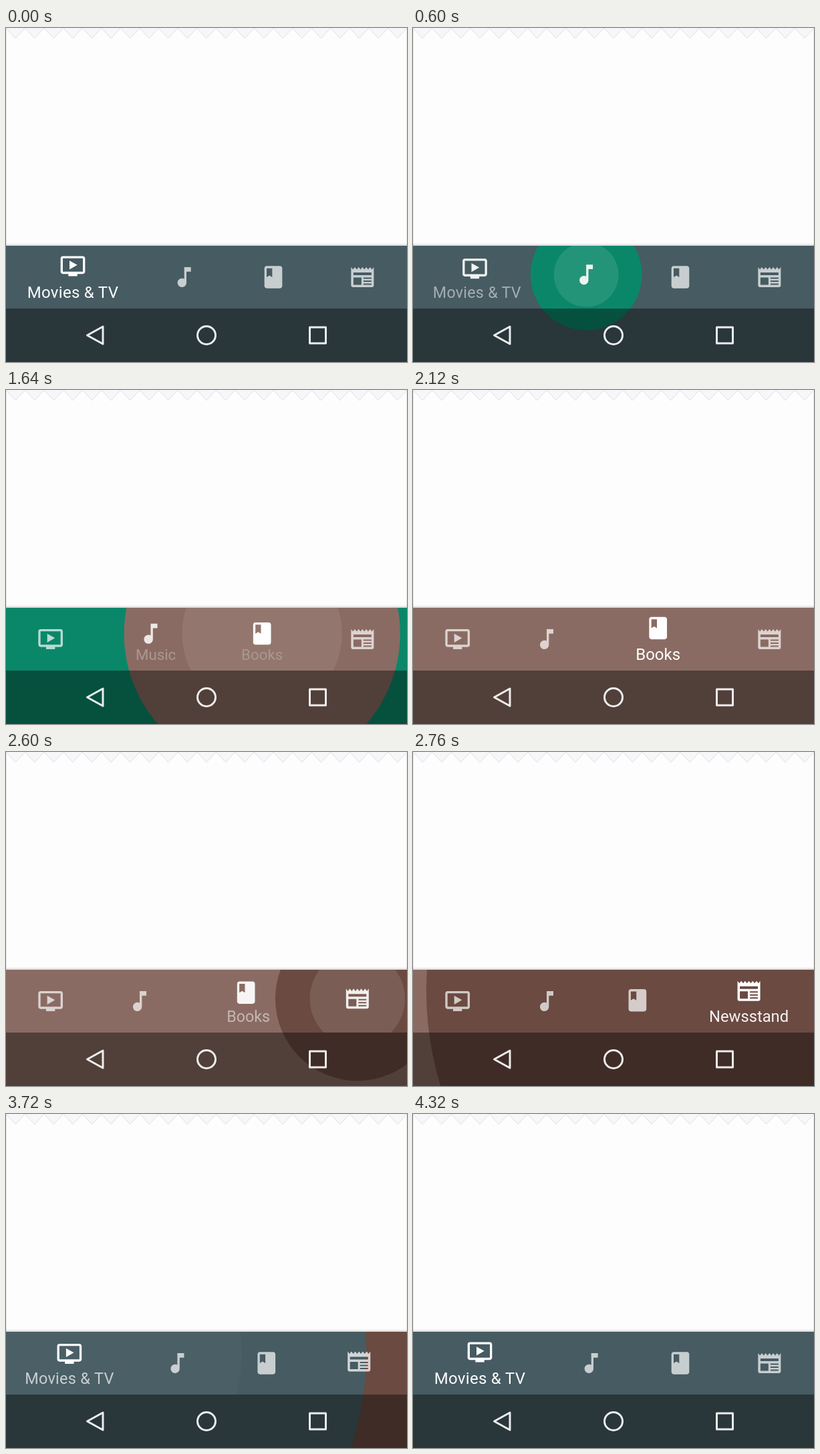
Recreate the animation shown at these times as an HTML page. Size 600 by 500 pixels, loop 4520 ms.

```html
<!DOCTYPE html>
<html lang="en">
<head>
<meta charset="utf-8">
<title>Shifting bottom navigation</title>
<style>
  html, body { margin: 0; width: 100%; height: 100%; overflow: hidden; background: #fefdfe; }
  svg { display: block; width: 100vw; height: 100vh; }
  text { font: 24px Roboto, Arial, sans-serif; text-anchor: middle; fill: #fff; }
  .tab path { fill: #fff; fill-rule: evenodd; }
  .system { fill: none; stroke: #fff; stroke-opacity: .91; stroke-width: 3; stroke-linejoin: round; }
</style>
</head>
<body>
<svg viewBox="0 0 600 500">
  <defs>
    <clipPath id="bars"><rect y="326" width="600" height="174"/></clipPath>
    <clipPath id="tabBar"><rect y="326" width="600" height="94"/></clipPath>
    <linearGradient id="shade" x2="0" y2="1">
      <stop stop-opacity="0"/><stop offset="1" stop-opacity=".16"/>
    </linearGradient>
  </defs>

  <rect width="600" height="500" fill="#fefdfe"/>
  <path id="tear" fill="#f8f6f9" stroke="#dddde0"/>
  <path d="M.5 0V326M599.5 0V326" stroke="#e5e5e8"/>
  <rect y="322" width="600" height="4" fill="url(#shade)"/>

  <rect id="base" y="326" width="600" height="174"/>
  <g clip-path="url(#bars)"><circle id="reveal"/></g>
  <g clip-path="url(#tabBar)"><circle id="touch" fill="#fff"/></g>
  <rect y="420" width="600" height="80" fill="#000" fill-opacity=".41"/>

  <g class="tab">
    <path transform="scale(1.6667) translate(-12 -12)" d="M21 3H3c-1.11 0-2 .89-2 2v12c0 1.1.89 2 2 2h5v2h8v-2h5c1.1 0 2-.9 2-2V5c0-1.11-.9-2-2-2zm0 14H3V5h18zm-5-6l-7 4V7z"/>
  </g>
  <g class="tab">
    <path transform="scale(1.6667) translate(-12 -12)" d="M12 3v10.55c-.59-.34-1.27-.55-2-.55-2.21 0-4 1.79-4 4s1.79 4 4 4 4-1.79 4-4V7h4V3z"/>
  </g>
  <g class="tab">
    <path transform="scale(1.6667) translate(-12 -12)" d="M18 2H6c-1.1 0-2 .9-2 2v16c0 1.1.9 2 2 2h12c1.1 0 2-.9 2-2V4c0-1.1-.9-2-2-2zM6 4h5v8l-2.5-1.5L6 12z"/>
  </g>
  <g class="tab">
    <path d="M-17-15l2.8 3.6 2.8-3.6 2.9 3.6 2.8-3.6 2.9 3.6L0-15l2.8 3.6L5.7-15l2.8 3.6 2.9-3.6 2.8 3.6L17-15V12q0 3-3 3H-14q-3 0-3-3zM-13.5-7h27v4h-27zM-13.5 .5h12v11h-12zM1.5 .5h12v2h-12zM1.5 5h12v2h-12zM1.5 9.5h12v2h-12z"/>
  </g>

  <text letter-spacing=".3">Movies &amp; TV</text>
  <text>Music</text>
  <text>Books</text>
  <text>Newsstand</text>

  <g class="system">
    <path d="M121.5 460L145 447V473Z"/>
    <circle cx="300" cy="460" r="13.5"/>
    <rect x="454.5" y="448" width="24" height="24"/>
  </g>
</svg>
<script>
  const LOOP = 4520, FRAME = 40, FIRST = 508, STEP = 1000, SHIFT = 375;
  const COLORS = ['#465b62', '#0a8769', '#8a6b63', '#6a4a41'];
  const $ = id => document.getElementById(id);
  const icons = document.querySelectorAll('.tab');
  const labels = document.querySelectorAll('text');

  const clamp = v => Math.min(1, Math.max(0, v));
  const mix = (a, b, k) => a + (b - a) * k;
  const set = (el, attrs) => {
    for (const name in attrs) el.setAttribute(name, attrs[name]);
  };

  // cubic-bezier(.4, 0, .2, 1), solved by bisection
  function ease(x) {
    let lo = 0, hi = 1, s = .5;
    for (let i = 0; i < 24; i++) {
      s = (lo + hi) / 2;
      const at = 1.2 * (1 - s) ** 2 * s + .6 * (1 - s) * s * s + s ** 3;
      if (at < x) lo = s; else hi = s;
    }
    return x >= 1 ? 1 : s * s * (3 - 2 * s);
  }

  // The active tab takes a third of the width, the others share the rest
  function centers(weights) {
    let left = 0;
    return weights.map(w => {
      const width = 400 / 3 + w * 200 / 3;
      left += width;
      return left - width / 2;
    });
  }

  function draw(t) {
    const turn = Math.floor((t - FIRST) / STEP);
    const from = turn < 0 ? 0 : Math.min(turn, 3);
    const to = turn < 0 ? 0 : (from + 1) % 4;
    const time = turn < 0 ? 1 : clamp((t - FIRST - from * STEP) / SHIFT);
    const p = ease(time);

    const weights = COLORS.map((_, i) => i === to ? p : i === from ? 1 - p : 0);
    const xs = centers(weights);
    const startXs = centers(COLORS.map((_, i) => +(i === from)));
    const iconY = i => 373 - 16.5 * weights[i];

    icons.forEach((icon, i) => {
      const lit = i === to ? clamp(3 * p) : weights[i];
      set(icon, { transform: `translate(${xs[i]} ${iconY(i)})`, opacity: .7 + .3 * lit });
    });

    labels.forEach((label, i) => {
      const incoming = i === to;
      const x = incoming ? xs[i] : mix(startXs[i], xs[i], .55);
      const alpha = incoming ? clamp((time - .25) / .45) : i === from ? clamp(1 - 2 * time) : 0;
      set(label, {
        transform: `translate(${x} 403.5) scale(${mix(6 / 7, 1, weights[i])})`,
        opacity: alpha
      });
    });

    const full = Math.hypot(Math.max(xs[to], 600 - xs[to]), 143);
    const radius = Math.max(9, full * p);
    const center = { cx: xs[to], cy: iconY(to) };
    set($('base'), { fill: COLORS[time < 1 ? from : to] });
    set($('reveal'), { ...center, r: time < 1 ? radius : 0, fill: COLORS[to] });
    set($('touch'), { ...center, r: radius * .58, opacity: .17 * clamp(1 - time / .65) });
  }

  let tear = 'M0 0';
  for (let i = 0; i < 21; i++) tear += `L${(i + .5) * 600 / 21} 15.5L${(i + 1) * 600 / 21} 0`;
  set($('tear'), { d: tear });

  const start = performance.now();
  function tick() {
    const t = (performance.now() - start + 1) % LOOP;
    draw(Math.floor(t / FRAME) * FRAME);
    requestAnimationFrame(tick);
  }
  tick();
</script>
</body>
</html>
```
